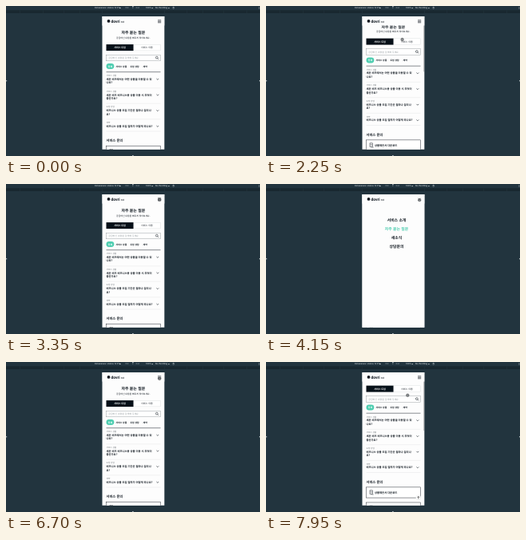
An HTML page that plays this animation: 318 px wide and 188 px high, repeating every 8000 ms.

```html
<!DOCTYPE html>
<html lang="ko">
<head>
<meta charset="utf-8">
<style>
html, body { margin: 0; width: 100%; height: 100%; overflow: hidden; background: #22343e; }
svg { display: block; width: 100vw; height: 100vh; }
text { font-family: "Noto Sans CJK KR", "Noto Sans CJK", sans-serif; text-rendering: geometricPrecision; }
.ui { font-family: Roboto, "Open Sans", sans-serif; }
</style>
</head>
<body>
<svg id="stage" viewBox="0 0 318 188">
  <defs>
    <clipPath id="screen"><rect x="120.5" y="12.9" width="77.8" height="166.9"/></clipPath>
  </defs>
  <rect width="318" height="188" fill="#22343e"/>
  <g id="toolbar"></g>
  <g clip-path="url(#screen)">
    <rect x="120" y="12" width="79" height="169" fill="#fdfdfd"/>
    <g id="page"></g>
    <g id="topButton">
      <circle cx="190.8" cy="170" r="3.1" fill="#fff" stroke="#d5d8da" stroke-width=".3"/>
      <path d="M190.8 171.6v-3M189.6 169.8l1.2-1.3 1.2 1.3" fill="none" stroke="#111" stroke-width=".6"/>
    </g>
    <rect id="bar" x="197.4" width=".9" height="66" rx=".45" fill="#777"/>
    <rect x="120" y="12" width="79" height="12.5" fill="#fdfdfd"/>
    <g id="burger"></g>
    <g id="menu"><rect x="120" y="12" width="79" height="169" fill="#fdfdfd"/></g>
    <g id="brand"></g>
  </g>
  <g id="cursor">
    <circle r="1.9" fill="#4b5053" fill-opacity=".68" stroke="#2b3033" stroke-opacity=".7" stroke-width=".4"/>
    <circle r=".7" fill="#aab0b2" fill-opacity=".45"/>
  </g>
</svg>
<script>
const LOOP = 8000, STEP = 50;
const INK = '#101820', GREY = '#6d7478', LINE = '#d6d9db', TEAL = '#4ecdb0';
const el = id => document.getElementById(id);

function add(parent, tag, attrs, content) {
  const node = document.createElementNS('http://www.w3.org/2000/svg', tag);
  for (const key in attrs) node.setAttribute(key, attrs[key]);
  if (content) node.textContent = content;
  return el(parent).appendChild(node);
}
const label = (parent, x, y, size, content, opts = {}) =>
  add(parent, 'text', { x, y, 'font-size': size, fill: INK, ...opts }, content);
const box = (parent, x, y, width, height, opts) =>
  add(parent, 'rect', { x, y, width, height, ...opts });
const path = (parent, d, stroke = INK, width = 0.5) =>
  add(parent, 'path', { d, fill: 'none', stroke, 'stroke-width': width });

const BOLD = { 'font-weight': 700 };
const MID = { 'text-anchor': 'middle' };

function buildToolbar() {
  box('toolbar', 0, 5.3, 318, 3.7, { fill: '#192830' });
  for (const x of [17, 46, 72, 92, 120, 198, 226, 246, 272, 301])
    box('toolbar', x, 5.3, 0.5, 3.7, { fill: '#22343e' });
  const ui = { class: 'ui', fill: '#e1e7ea' };
  const dim = { class: 'ui', fill: '#8e9ba2' };
  label('toolbar', 111, 3.4, 2.75, 'Dimensions: Velora 12 Pro', ui);
  label('toolbar', 149, 3.4, 2.75, '390', dim);
  label('toolbar', 158, 3.4, 2.9, '×', ui);
  label('toolbar', 162.5, 3.4, 2.75, '844', dim);
  label('toolbar', 175, 3.4, 2.75, '100%', ui);
  label('toolbar', 186.8, 3.4, 2.75, 'No throttling', ui);
  for (const x of [142, 182.3, 203])
    add('toolbar', 'path', { d: `M${x} 2h1.8l-.9 1.2z`, fill: '#e1e7ea' });
  box('toolbar', 209, 1.4, 1.5, 2.2, { fill: 'none', stroke: '#b9c3c8', 'stroke-width': 0.4 });
  for (const y of [1.2, 2.3, 3.4])
    box('toolbar', 316.6, y, 0.7, 0.6, { fill: '#d3dadd' });
  for (const [x, y] of [[0, 93.3], [317, 93.3], [158.3, 187], [158.3, 0]])
    box('toolbar', x, y, 1.2, 1, { fill: '#dfe5e8' });
}

function buildBrand() {
  add('brand', 'circle', { cx: 128.5, cy: 18.9, r: 1.9, fill: INK });
  label('brand', 131.4, 20.8, 5, 'dovri', { class: 'ui', 'font-weight': 700 });
  label('brand', 144, 20.8, 2.9, 'BIZ', { class: 'ui' });
  for (const y of [17.8, 19.3, 20.8]) path('burger', `M190 ${y}h4.2`, INK, 0.65);
}

function buildQuestion(y, kind, lines, ruleY) {
  label('page', 125.5, y, 2.6, kind, { fill: GREY });
  lines.forEach((line, i) => label('page', 125.5, y + 4.8 + i * 4.5, 3.3, line, BOLD));
  path('page', `M188.4 ${y + 3}l1.4 1.4 1.4-1.4`, INK, 0.6);
  path('page', `M125.5 ${ruleY}h68`, LINE, 0.35);
}

function buildButton(y, content) {
  box('page', 125.5, y, 68.2, 13.2, { fill: '#fff', stroke: INK, 'stroke-width': 0.45 });
  box('page', 130, y + 4, 3.4, 4.4, { fill: 'none', stroke: INK, 'stroke-width': 0.5 });
  path('page', `M130.8 ${y + 5.5}h1.8M130.8 ${y + 6.8}h1.8M132 ${y + 9.2}h2.8`, INK, 0.4);
  label('page', 136, y + 7.8, 3.3, content, BOLD);
}

function buildPage() {
  label('page', 159.3, 35.1, 4.9, '자주 묻는 질문', { ...BOLD, ...MID });
  label('page', 159.3, 40.8, 2.85, '궁금하신 내용을 빠르게 찾아보세요.', MID);

  box('page', 159.4, 48.3, 34.1, 7.6, { fill: '#fff', stroke: LINE, 'stroke-width': 0.4 });
  box('page', 125.5, 48.1, 34, 8, { fill: '#061018' });
  label('page', 142.5, 53.2, 3, '서비스 도입', { ...MID, ...BOLD, fill: '#fff' });
  label('page', 176.4, 53.2, 3, '서비스 이용', MID);

  box('page', 125.7, 61.2, 67.8, 7.6, { fill: '#fff', stroke: '#868d91', 'stroke-width': 0.4 });
  label('page', 128.2, 66.1, 2.95, '궁금하신 내용을 검색해 주세요', { fill: '#969da1' });
  add('page', 'circle', { cx: 188.8, cy: 64.6, r: 1.4, fill: 'none', stroke: INK, 'stroke-width': 0.55 });
  path('page', 'M189.8 65.6l1.3 1.3', INK, 0.6);

  box('page', 125.5, 72.1, 9.8, 6.8, { rx: 3.4, fill: TEAL });
  label('page', 130.4, 76.5, 2.8, '전체', { ...MID, ...BOLD, fill: '#fff' });
  for (const [x, name] of [[137.6, '서비스 상품'], [155.5, '도입 상담'], [171.6, '계약']])
    label('page', x, 76.5, 2.8, name, BOLD);

  path('page', 'M125.5 82.7h68', INK, 0.5);
  buildQuestion(88, '서비스 상품', ['새온 비즈에서는 어떤 상품을 이용할 수 있', '나요?'], 102.8);
  buildQuestion(107.8, '서비스 상품', ['새온 비즈 비즈니스용 상품 이용 시 무엇이', '좋은가요?'], 122.2);
  buildQuestion(127.4, '도입 상담', ['비즈니스 상품 도입 기간은 얼마나 걸리나', '요?'], 141.8);
  buildQuestion(147, '계약', ['비즈니스 상품 도입 절차가 어떻게 되나요?'], 157);

  label('page', 125.5, 170.1, 4.25, '서비스 문의', BOLD);
  buildButton(175.4, '상품제안서 다운로드');
  buildButton(194.5, '서비스 상담 신청');
}

function buildMenu() {
  ['서비스 소개', '자주 묻는 질문', '새소식', '상담문의'].forEach((name, i) =>
    label('menu', 163.5, 46.7 + i * 11.1, 4.85, name, { ...BOLD, ...MID, fill: i === 1 ? TEAL : INK }));
  path('menu', 'M190.5 17.7l3.1 3.1M193.6 17.7l-3.1 3.1', INK, 0.55);
}

// Keys are [time, ...values], joined by straight lines.
function track(keys, t) {
  let i = 1;
  while (i < keys.length - 1 && keys[i][0] < t) i++;
  const a = keys[i - 1], b = keys[i];
  const k = Math.min(1, Math.max(0, (t - a[0]) / (b[0] - a[0])));
  return a.slice(1).map((v, n) => v + (b[n + 1] - v) * k);
}

const SCROLL = [[2100, 0], [2250, 7.5], [2500, 18.5], [2650, 18.5], [2950, 0],
  [7200, 0], [7700, 13.5], [7950, 18.5]];
const MENU = [[3400, 0], [3800, 1], [6200, 1], [6550, 0]];
const CURSOR = [[300, 38, 98], [400, 42, 96], [550, 74, 72], [800, 102, 53.5], [1000, 102, 53.5],
  [1600, 170.7, 34], [1750, 170.7, 34], [1950, 170.6, 42], [2950, 170.6, 42],
  [3250, 192.2, 19.6], [4450, 192.2, 20.2], [4800, 183.5, 31.5], [5300, 192, 27],
  [5400, 192, 27], [5700, 192.2, 21], [6750, 192.2, 20.8], [7000, 178, 41.5], [7050, 177.3, 41.7]];

function draw(time) {
  const t = Math.floor((time % LOOP) / STEP) * STEP;
  const [scroll] = track(SCROLL, t);
  const [open] = track(MENU, t);
  const [x, y] = track(CURSOR, t);
  el('page').setAttribute('transform', `translate(0 ${-scroll})`);
  el('menu').setAttribute('opacity', open);
  el('burger').setAttribute('opacity', 1 - open);
  el('topButton').setAttribute('opacity', scroll > 10 ? 1 : 0);
  el('bar').setAttribute('opacity', scroll > 0 ? 0.75 : 0);
  el('bar').setAttribute('y', 14 + scroll * 0.33);
  el('cursor').setAttribute('transform', `translate(${x} ${y})`);
  el('cursor').setAttribute('opacity', t < 350 ? 0 : 1);
}

buildToolbar();
buildBrand();
buildPage();
buildMenu();

const start = performance.now();
function tick() {
  draw(performance.now() - start);
  requestAnimationFrame(tick);
}
tick();
</script>
</body>
</html>
```
